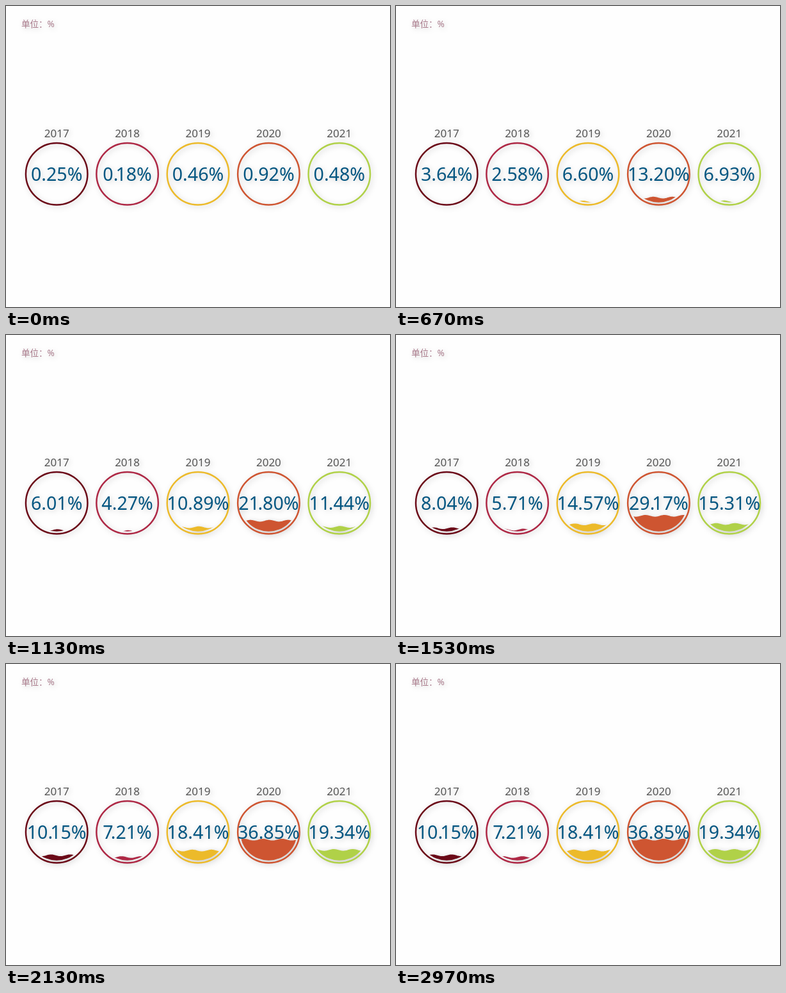
Recreate the animation shown at these times as an HTML page. Size 600 by 470 pixels, loop 3010 ms.

```html
<!DOCTYPE html>
<html lang="zh">
<head>
<meta charset="utf-8">
<style>
html, body { margin: 0; width: 100%; height: 100%; overflow: hidden; background: #fefefe; }
svg { display: block; filter: drop-shadow(2px 2px 4px rgba(0, 0, 0, .2)); }
text { font-family: "Noto Sans", "Noto Sans CJK SC", "Noto Sans CJK", sans-serif; }
.unit { font-size: 13.5px; fill: #a97a8b; }
.year { font-size: 17px; fill: #555; text-anchor: middle; }
.value { font-size: 28.6px; fill: #045681; text-anchor: middle; }
</style>
</head>
<body>
<svg width="600" height="470" viewBox="0 0 600 470">
  <clipPath id="bowl"><circle r="44.55"/></clipPath>
  <text class="unit" x="24" y="33">单位：%</text>
</svg>
<script>
const GAUGES = [
  ['2017', 10.15, '#6b0a18'],
  ['2018', 7.21, '#ae2845'],
  ['2019', 18.41, '#ecba2a'],
  ['2020', 36.85, '#ce5531'],
  ['2021', 19.34, '#b0d148'],
];
const RADIUS = 49.5, FILL = RADIUS * .9, WAVE = FILL * .03, LENGTH = FILL * 2 / 3;
const RISE_MS = 2000, WAVE_MS = 1500, LOOP_MS = 3010, STEP_MS = 100 / 3, LAST_STEP = 89;
const KERN = { '7.': -4, '.1': -4, '1.': -2.5 };
const svg = document.querySelector('svg');

function add(parent, tag, attrs, text = '') {
  const el = document.createElementNS('http://www.w3.org/2000/svg', tag);
  for (const key in attrs) el.setAttribute(key, attrs[key]);
  el.textContent = text;
  return parent.appendChild(el);
}

const gauges = GAUGES.map(([year, value, color], i) => {
  const g = add(svg, 'g', { transform: `translate(${79.2 + 110.4 * i} 262.2)` });
  add(g, 'text', { class: 'year', y: -57.2 }, year);
  add(g, 'circle', { r: RADIUS * .975, fill: 'none', stroke: color, 'stroke-width': RADIUS * .05 });
  return {
    value,
    label: add(g, 'text', { class: 'value', y: 10.3 }),
    wave: add(g, 'path', { fill: color, 'clip-path': 'url(#bowl)' }),
  };
});

function wavePath(level, shift) {
  let d = `M${-FILL} ${RADIUS}`;
  for (let x = -FILL; x <= FILL + 1; x++) {
    const y = level + WAVE * Math.sin(2 * Math.PI * ((x + FILL) / LENGTH - shift));
    d += `L${x.toFixed(2)} ${y.toFixed(2)}`;
  }
  return d + `V${RADIUS}Z`;
}

function draw(time) {
  const rise = Math.min(time / RISE_MS, 1);
  for (const { value, label, wave } of gauges) {
    const text = (value * rise).toFixed(2) + '%';
    label.textContent = text;
    label.setAttribute('dx', [...text].map((c, i) => KERN[text[i - 1] + c] || 0).join(' '));
    // The liquid starts below the ring and rises to its share of the bowl
    const start = RADIUS + WAVE;
    const end = FILL + WAVE - value / 100 * 2 * (FILL + WAVE);
    wave.setAttribute('d', wavePath(start + (end - start) * rise, time / WAVE_MS));
  }
}

const begin = performance.now();
function tick() {
  const t = (performance.now() - begin) % LOOP_MS;
  const step = Math.min(LAST_STEP, Math.floor((Math.floor(t / 10) * 10 + 5) / STEP_MS));
  draw(50 + step * STEP_MS);
  requestAnimationFrame(tick);
}
tick();
</script>
</body>
</html>
```
